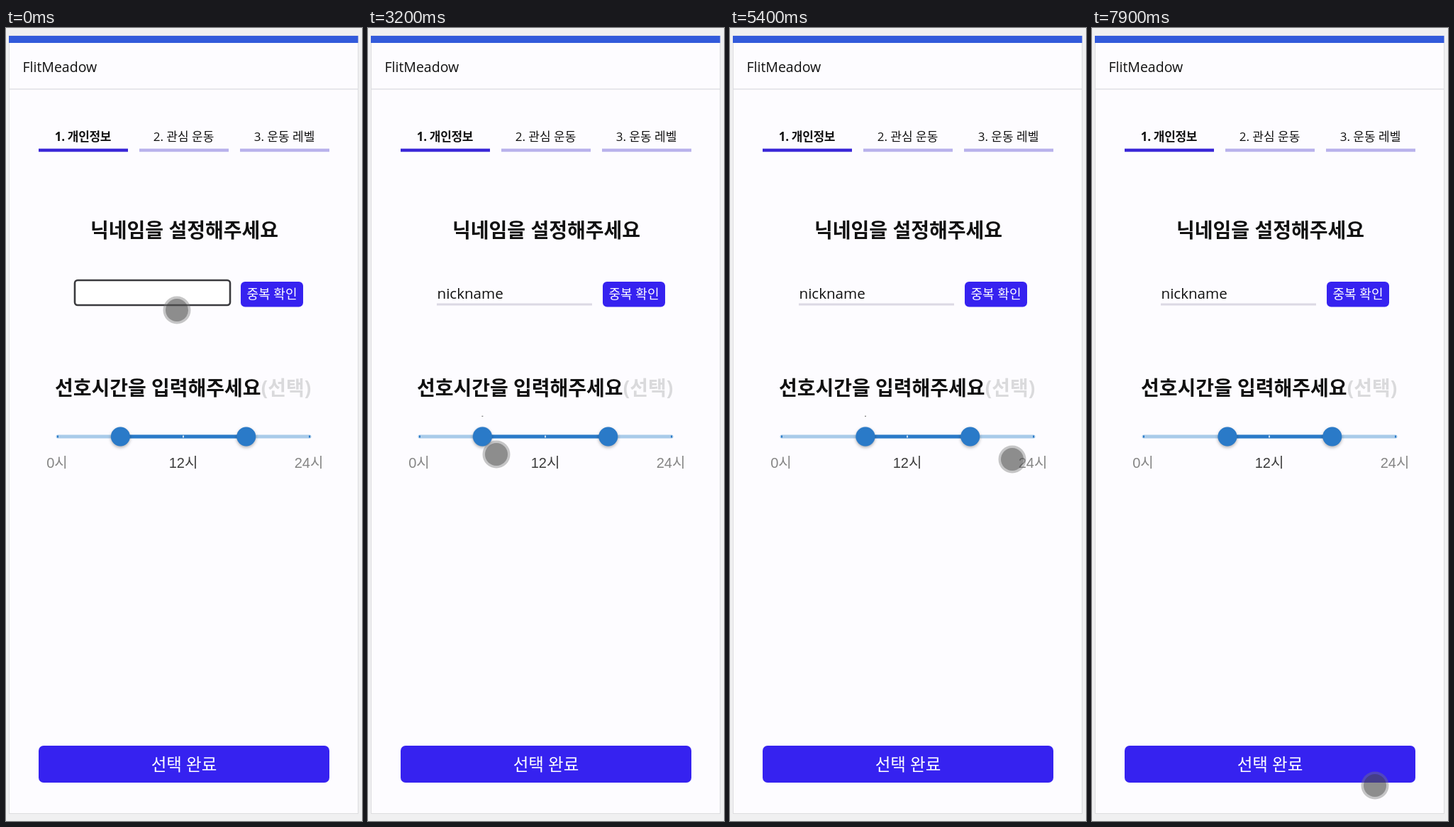
Write an HTML page that moves like this. It is 502 px wide and 1116 px high and loops after 8000 ms.

```html
<!DOCTYPE html>
<html lang="ko">
<head>
<meta charset="utf-8">
<style>
  html, body { margin: 0; width: 100%; height: 100%; overflow: hidden; background: #f0f0f1; }
  svg { display: block; }
  text { font-family: "Open Sans", "Noto Sans CJK KR", "Noto Sans CJK", sans-serif; fill: #111; }
  .mid { text-anchor: middle; }
  .title { font-size: 28px; font-weight: 700; }
  .step { font-size: 17px; }
  .hour, .tip text { font-family: "Liberation Sans", "Noto Sans CJK KR", "Noto Sans CJK", sans-serif; font-size: 20px; }
  .hour { fill: #858585; font-weight: 300; }
  .button rect { fill: #3622f0; }
  .button text { fill: #fff; font-weight: 500; }
  .thumb { fill: #2a7ac8; filter: drop-shadow(0 2px 2px rgba(0, 0, 0, .3)); }
  .halo { fill: #2a7ac8; opacity: .17; }
  .tip { fill: #757575; }
  .tip text { fill: #fff; }
</style>
</head>
<body>
<svg width="502" height="1116" viewBox="0 0 502 1116">
  <rect x="4.5" y="11" width="492" height="1094.5" fill="#fdfcff" stroke="#dddde0"/>
  <rect x="4" y="11" width="492.5" height="10" fill="#325adb"/>
  <path d="M5 86H496" stroke="#e1e1e5" stroke-width="1.5"/>
  <text x="23.5" y="62" font-size="19.5">FlitMeadow</text>

  <text class="step mid" x="108.5" y="158.500" font-weight="700" letter-spacing="-.3">1. 개인정보</text>
  <text class="step mid" x="250.5" y="158.500">2. 관심 운동</text>
  <text class="step mid" x="392.5" y="158.500">3. 운동 레벨</text>
  <path d="M46 172H172" stroke="#3b28d8" stroke-width="4.5"/>
  <path d="M188 172H314M330 172H456" stroke="#b9b2ec" stroke-width="4.5"/>

  <text class="title mid" x="251.5" y="295">닉네임을 설정해주세요</text>
  <path id="underline" d="M97 389H316" stroke="#dcd9e4" stroke-width="3"/>
  <rect id="focus" x="97" y="355" width="219" height="35" rx="4" fill="#fff" stroke="#3a3a3e" stroke-width="2.6"/>
  <text id="nick" x="97.5" y="381" font-size="20.6"></text>
  <path id="caret" d="M0 359V387" stroke="#555" stroke-width="1.4"/>
  <g class="button">
    <rect x="331" y="357" width="88" height="35.500" rx="6"/>
    <text class="mid" x="375" y="381" font-size="18">중복 확인</text>
  </g>

  <text class="title" x="69" y="517">선호시간을 입력해주세요<tspan fill="#dadadc">(선택)</tspan></text>
  <path d="M73 575H428" stroke="#a9cbe9" stroke-width="5" stroke-linecap="round"/>
  <path d="M72 575h2M427 575h2" stroke="#2a7ac8" stroke-width="3"/>
  <path id="range" stroke="#2a7ac8" stroke-width="5"/>
  <path id="noon" d="M249 575h2" stroke="#cfe2f3" stroke-width="3"/>
  <text class="hour mid" x="72" y="619">0시</text>
  <text class="hour mid" x="250" y="619" id="noonLabel">12시</text>
  <text class="hour mid" x="427" y="619">24시</text>
  <g id="sliders"></g>

  <g class="button">
    <rect x="46" y="1010" width="410" height="52" rx="7"/>
    <text class="mid" x="251" y="1045" font-size="23.500">선택 완료</text>
  </g>

  <g id="pointer">
    <circle r="19.5" fill="#777" opacity=".42"/>
    <circle id="core" r="16" fill="#333" opacity=".38"/>
  </g>
</svg>
<script>
const $ = id => document.getElementById(id);
const clamp = v => Math.max(0, Math.min(1, v));
const LOOP = 8000, FRAME = 100;
const hourX = h => 72.7 + 14.78 * h;

// Pointer keys: time, x, y
const path = [
  [200, 241, 397], [600, 376, 297], [2400, 376, 297], [3100, 181, 600],
  [3300, 181, 600], [4200, 290, 600], [4400, 290, 600], [5100, 216, 602],
  [5200, 216, 602], [5400, 398, 607], [5600, 351, 606], [5700, 351, 606],
  [6200, 425, 605], [6300, 425, 605], [6800, 377, 605], [6900, 366, 605],
  [7000, 366, 605], [7200, 351, 605], [7300, 351, 605], [7900, 399, 1066]
];
const keyTimes = [1000, 1200, 1400, 1600, 1700, 1800, 2000, 2100];

// Each thumb: resting hours, drag interval, grab offset, label interval
const thumbs = [
  { from: 6, to: 8, start: 3300, end: 5200, grab: 25, open: 3195, close: 5405 },
  { from: 18, to: 18, start: 5700, end: 7300, grab: 12, open: 5600, close: 7550 }
];

$('sliders').innerHTML = thumbs.map(() => `<g>
  <circle class="halo" cy="575"/>
  <circle class="thumb" cy="575" r="13.5"/>
  <g class="tip">
    <path d="M-25 -37H25Q28 -37 28 -34V-3Q28 0 25 0H7L0 7L-7 0H-25Q-28 0 -28 -3V-34Q-28 -37 -25 -37Z"/>
    <text class="mid" y="-13"></text>
  </g></g>`).join('');
thumbs.forEach((thumb, i) => {
  const group = $('sliders').children[i];
  thumb.group = group;
  thumb.halo = group.querySelector('.halo');
  thumb.tip = group.querySelector('.tip');
  thumb.label = group.querySelector('text');
});

function pointerAt(t) {
  const i = path.findIndex(key => key[0] >= t);
  if (i <= 0) return path[i ? path.length - 1 : 0].slice(1);
  const [t0, x0, y0] = path[i - 1], [t1, x1, y1] = path[i];
  const u = (t - t0) / (t1 - t0), e = u * u * (3 - 2 * u);
  return [x0 + (x1 - x0) * e, y0 + (y1 - y0) * e];
}

function show(id, visible) {
  $(id).style.display = visible ? '' : 'none';
}

function drawField(t) {
  const focused = t < 2400;
  $('nick').textContent = 'nickname'.slice(0, keyTimes.filter(k => k <= t).length);
  show('focus', focused);
  show('underline', !focused);
  show('caret', focused && (t >= 1000 || t >= 300 && t < 800));
  $('caret').setAttribute('transform', `translate(${98.5 + $('nick').getComputedTextLength()})`);
}

function drawSlider(t, x) {
  const hours = thumbs.map(thumb => {
    const { from, to, start, end, grab, open, close } = thumb;
    const hour = t < start ? from : t > end ? to : Math.round((x - grab - 72.7) / 14.78);
    const scale = clamp(Math.min(t - open, close - t) / 150);
    thumb.group.setAttribute('transform', `translate(${hourX(hour)})`);
    thumb.halo.setAttribute('r', 13.5 + 19 * scale);
    thumb.tip.setAttribute('transform', `translate(0 547) scale(${scale})`);
    thumb.label.textContent = hour;
    return hour;
  });
  const noonInside = hours[0] <= 12 && hours[1] >= 12;
  $('range').setAttribute('d', `M${hourX(hours[0])} 575H${hourX(hours[1])}`);
  show('noon', noonInside);
  $('noonLabel').style.fill = noonInside ? '#3c3c3c' : '';
}

function draw() {
  const t = Math.floor(performance.now() % LOOP / FRAME) * FRAME;
  const [x, y] = pointerAt(t);
  const pressed = thumbs.some(({ start, end }) => t >= start && t < end);
  drawField(t);
  drawSlider(t, x);
  $('pointer').setAttribute('transform', `translate(${x} ${y})`);
  $('core').setAttribute('opacity', pressed ? .46 : .38);
  requestAnimationFrame(draw);
}
draw();
</script>
</body>
</html>
```
